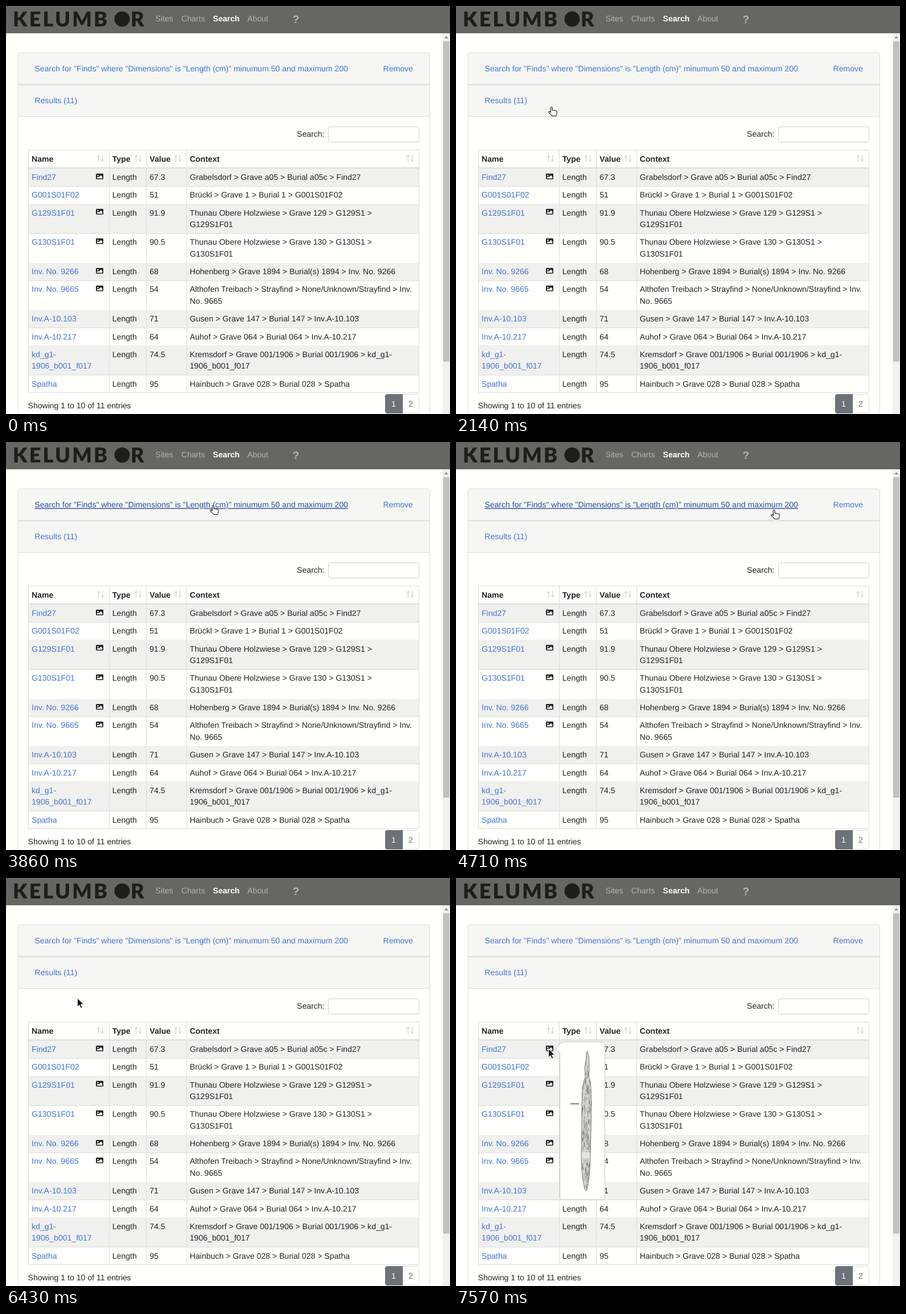
Write an HTML page that moves like this. It is 780x718 px and loops after 8000 ms.

```html
<!DOCTYPE html>
<html lang="en">
<head>
<meta charset="utf-8">
<title>Finds search</title>
<style>
  html, body { margin: 0; width: 100%; height: 100%; overflow: hidden; background: #fffffc; }
  svg { display: block; }
  text { font: 14.07px "Liberation Sans", Arial, sans-serif; fill: #212427; text-rendering: geometricPrecision; white-space: pre; }
  .bold { font-weight: bold; }
  .link { fill: #4475d9; }
  .link.hover { fill: #2a51a3; text-decoration: underline; }
  .nav text { fill: #b3b3b0; }
  .nav .active { fill: #fff; }
  .nav .brand { font: 900 36px Lato, sans-serif; letter-spacing: 3.2px; fill: #1d1d1b; }
  .line { stroke: #dcdedd; fill: none; }
  .sort { stroke: #c6c8c8; fill: none; }
</style>
</head>
<body>
<svg width="780" height="718" viewBox="0 0 780 718">
  <defs>
    <g id="sort" class="sort">
      <path d="M3.5 12V.8M.7 4 3.5.8 6.3 4M10.5 0V11.2M7.7 8 10.5 11.2 13.3 8"/>
    </g>
    <g id="picture">
      <rect width="13" height="10" rx="1.4" fill="#212427"/>
      <circle cx="3.4" cy="3.2" r="1.2" fill="#f4f4f1"/>
      <path d="M1.7 8.4V7l2-2 1.4 1.4L8.7 2.8l2.6 2.6v3z" fill="#f4f4f1"/>
    </g>
    <path id="blade" d="M231 305Q234 314 234 325L233.5 350Q237 358 237 368L238 400 237 450 236 490 235 515Q233 537 230 549Q228 552 226 547Q222 530 221 515L220 490 221 440 221 400 222 370Q224 358 227 350L226 333Q229 322 229 307Z"/>
    <clipPath id="bladeClip"><use href="#blade"/></clipPath>
  </defs>

  <rect width="780" height="718" fill="#fffffc"/>

  <g class="nav">
    <rect width="780" height="48" fill="#666663"/>
    <text class="brand" x="12" y="36">KELUMB</text>
    <circle cx="204" cy="23" r="13.5" fill="#1d1d1b"/>
    <text class="brand" x="219" y="36">R</text>
    <text x="262.5" y="27.3">Sites</text>
    <text x="308" y="27.3">Charts</text>
    <text class="bold active" x="363.5" y="27.3">Search</text>
    <text x="424" y="27.3">About</text>
    <text class="bold" x="503.5" y="29.5" style="font-size:19px">?</text>
  </g>

  <g>
    <rect x="767" y="48" width="13" height="670" fill="#f1f1ee"/>
    <path d="M770 57l3.5-4 3.5 4z" fill="#8b8b89"/>
    <rect x="768" y="62" width="11" height="564" fill="#c1c1bf"/>
  </g>

  <path d="M21 194V86.5q0-4 4-4H740.500q4 0 4 4V194z" fill="#f6f6f3"/>
  <path class="line" d="M21 718V86.5q0-4 4-4H740.500q4 0 4 4V718M21 194.500H744.500"/>
  <path class="line" d="M21 138.500H744.500" stroke-width="2"/>
  <text id="query" class="link" x="50.3" y="115.300">Search for "Finds" where "Dimensions" is "Length (cm)" minumum 50 and maximum 200</text>
  <text class="link" x="662.500" y="115.300">Remove</text>
  <text id="results" class="link" x="50.3" y="171.100">Results (11)</text>

  <text x="511" y="229.800">Search:</text>
  <rect x="566.500" y="212.500" width="159" height="27" rx="3.500" fill="#fffffc" stroke="#cdd1d3"/>

  <g id="table"></g>

  <text x="38.500" y="708">Showing 1 to 10 of 11 entries</text>
  <path d="M697 683.500h24.500q4 0 4 4v25q0 4-4 4H697z" fill="#fffffc" class="line" style="fill:#fffffc"/>
  <path d="M697 683h-27q-4 0-4 4v26q0 4 4 4h27z" fill="#6c7278"/>
  <text x="677" y="705" style="fill:#fff">1</text>
  <text x="707" y="705" style="fill:#6c7278">2</text>

  <g id="popover">
    <path d="M186.500 288.500H257.500q4 0 4 4V562q0 4-4 4H186.500q-4 0-4-4V307.500L175 300l7.500-7.500q0-4 4-4z" fill="#fffffc" stroke="#c8c8c6"/>
    <use href="#blade" fill="#d3d3d0"/>
    <g id="hatching" clip-path="url(#bladeClip)" fill="none"></g>
    <use href="#blade" fill="none" stroke="#62625f" stroke-width=".8"/>
    <path d="M201 397.500h15.500" stroke="#a2a29e" stroke-width="2.500"/>
    <path d="M201 396.500h15.500" stroke="#666663" stroke-width=".6"/>
  </g>

  <path id="arrow" d="M0 0V15.200L3.500 12 5.800 17.500 8.300 16.400 6 11H10.800Z" fill="#161616" stroke="#fff" stroke-width=".9"/>
  <path id="hand" d="M4.300 10.200V2.200a1.400 1.400 0 0 1 2.800 0V6.600q1.300-.8 2.600.2 1.300-.6 2.500.4 2.600-.5 2.900 1.700V11.500q0 2.600-1.500 5H6.700Q4.800 13.800 1.200 10.600.5 8.900 2 8.600 3.200 8.800 4.300 10.200Z" fill="#fff" stroke="#1b1b1b" stroke-width="1.100" stroke-linejoin="round"/>
</svg>

<script>
const byId = id => document.getElementById(id);

// name lines, value, context lines, has picture
const rows = [
  ['Find27', '67.3', 'Grabelsdorf > Grave a05 > Burial a05c > Find27', true],
  ['G001S01F02', '51', 'Brückl > Grave 1 > Burial 1 > G001S01F02'],
  ['G129S1F01', '91.9', 'Thunau Obere Holzwiese > Grave 129 > G129S1 >|G129S1F01', true],
  ['G130S1F01', '90.5', 'Thunau Obere Holzwiese > Grave 130 > G130S1 >|G130S1F01', true],
  ['Inv. No. 9266', '68', 'Hohenberg > Grave 1894 > Burial(s) 1894 > Inv. No. 9266', true],
  ['Inv. No. 9665', '54', 'Althofen Treibach > Strayfind > None/Unknown/Strayfind > Inv.|No. 9665', true],
  ['Inv.A-10.103', '71', 'Gusen > Grave 147 > Burial 147 > Inv.A-10.103'],
  ['Inv.A-10.217', '64', 'Auhof > Grave 064 > Burial 064 > Inv.A-10.217'],
  ['kd_g1-|1906_b001_f017', '74.5', 'Kremsdorf > Grave 001/1906 > Burial 001/1906 > kd_g1-|1906_b001_f017'],
  ['Spatha', '95', 'Hainbuch > Grave 028 > Burial 028 > Spatha']
];
const columns = { Name: 45, Type: 186.8, Value: 252.3, Context: 322.8 };
const lineHeight = 20.5;

function cell(content, x, y, cls = '') {
  return content.split('|').map((line, i) =>
    `<text class="${cls}" x="${x}" y="${y + i * lineHeight}">${line.replace(/>/g, '&gt;')}</text>`).join('');
}

function buildTable() {
  let out = '', top = 286;
  rows.forEach(([name, value, context, picture], i) => {
    const height = context.includes('|') ? 51.8 : 31.3;
    const y = top + 19.9;
    const edge = Math.floor(top + height) + .5;
    if (i % 2 === 0) out += `<rect x="39" y="${Math.floor(top)}" width="687" height="${edge - Math.floor(top)}" fill="#f0f0ee"/>`;
    out += `<path class="line" d="M39 ${edge}H726"/>`
      + cell(name, columns.Name, y, 'link') + cell('Length', columns.Type, y)
      + cell(value, columns.Value, y) + cell(context, columns.Context, y);
    if (picture) out += `<use href="#picture" x="158" y="${Math.round(top + 8.6)}"/>`;
    top += height;
  });
  for (const title in columns) out += cell(title, columns[title], 273.7, 'bold');
  for (const x of [159, 225, 295, 703]) out += `<use href="#sort" x="${x}" y="262"/>`;
  out += '<path class="line" d="M39 253.5H726M39.5 253V681M181.5 253V681M246.5 253V681M317.5 253V681M725.5 253V681"/>'
    + '<path class="line" d="M39 285H726" stroke-width="2"/>';
  byId('table').innerHTML = out;
}

function buildHatching() {
  let seed = 7, out = '';
  const random = () => (seed = seed * 16807 % 2147483647) / 2147483647;
  for (let i = 0; i < 330; i++) {
    const x = 220 + random() * 18, y = 306 + random() * 240;
    const shade = 70 + Math.floor(random() * 100);
    if (y > 481 && y < 494) continue;
    out += `<path d="M${x.toFixed(1)} ${y.toFixed(1)}l${(random() * 2 - 1).toFixed(1)} ${(2 + random() * 7).toFixed(1)}" stroke="rgb(${shade},${shade},${shade})" stroke-width=".6"/>`;
  }
  byId('hatching').innerHTML = out + '<path d="M220 483h18v10h-18z" fill="#e4e4e1"/>';
}

// time, pointer shape, x, y, hovered link, popover opacity
const steps = [
  [0, '', 0, 0],
  [430, 'arrow', 300, 4],
  [570, 'hand', 320, 120, 'query'],
  [1570, 'hand', 300, 108, 'query'],
  [1710, 'hand', 255, 91],
  [1860, 'arrow', 190, 262],
  [2000, 'arrow', 176, 226],
  [2140, 'hand', 162, 177],
  [2290, 'hand', 166, 150],
  [2430, 'hand', 176, 126],
  [2570, 'hand', 181, 108, 'query'],
  [3000, 'hand', 182, 109, 'query'],
  [3430, 'hand', 230, 108, 'query'],
  [3570, 'hand', 280, 109, 'query'],
  [3860, 'hand', 358, 111, 'query'],
  [4000, 'hand', 440, 114, 'query'],
  [4140, 'hand', 520, 117, 'query'],
  [4290, 'hand', 562, 119, 'query'],
  [4570, 'hand', 558, 119, 'query'],
  [4710, 'hand', 553, 119, 'query'],
  [4860, 'hand', 470, 135],
  [5000, 'hand', 330, 165],
  [5140, 'hand', 200, 184],
  [5290, 'arrow', 130, 197],
  [5430, 'hand', 112, 174, 'results'],
  [6000, 'hand', 114, 176, 'results'],
  [6290, 'hand', 120, 184],
  [6430, 'arrow', 125.5, 211.5],
  [6710, 'arrow', 140, 245],
  [6860, 'arrow', 155, 284],
  [7000, 'arrow', 160, 296, '', .5],
  [7140, 'arrow', 160, 296, '', 1],
  [7570, 'arrow', 162.5, 300.5, '', 1]
];

function render() {
  const time = performance.now() % 8000;
  const [, shape, x, y, hovered, opacity = 0] = steps.findLast(step => step[0] <= time);
  for (const id of ['arrow', 'hand']) {
    byId(id).style.display = id === shape ? '' : 'none';
    byId(id).setAttribute('transform', `translate(${x} ${y})`);
  }
  for (const id of ['query', 'results']) byId(id).classList.toggle('hover', id === hovered);
  byId('popover').style.opacity = opacity;
  requestAnimationFrame(render);
}

buildTable();
buildHatching();
render();
</script>
</body>
</html>
```
